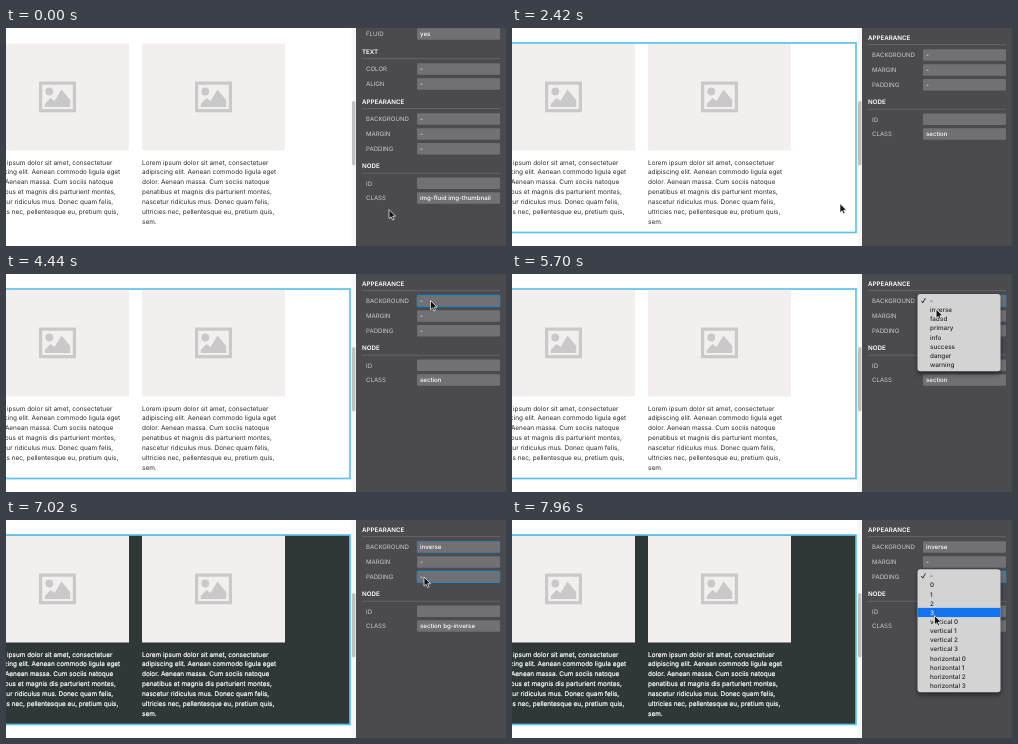
These frames come from a looping animation (500 px wide and 218 px high, 8 s). An HTML page:

```html
<!DOCTYPE html>
<html lang="en">
<head>
<meta charset="utf-8">
<title>Page builder: section background</title>
<style>
html, body { margin: 0; width: 100%; height: 100%; overflow: hidden; background: #fff; }
svg { display: block; width: 500px; height: 218px; font-family: Inter, Roboto, sans-serif; text-rendering: geometricPrecision; }
.copy { font-size: 6.45px; }
.label { font-size: 6.1px; fill: #c9c9cb; }
.head { font-size: 6.2px; font-weight: 600; fill: #fff; }
.value { font-size: 6.15px; font-weight: 500; fill: #fff; }
.item { font-size: 6.3px; font-weight: 500; }
</style>
</head>
<body>
<svg id="stage" viewBox="0 0 500 218"></svg>
<script>
const LOOP = 8000;
const stage = document.getElementById('stage');

function add(parent, tag, attrs = {}, text) {
  const el = document.createElementNS('http://www.w3.org/2000/svg', tag);
  for (const k in attrs) el.setAttribute(k, attrs[k]);
  if (text !== undefined) el.textContent = text;
  parent.appendChild(el);
  return el;
}
const rect = (p, x, y, width, height, fill, more) => add(p, 'rect', { x, y, width, height, fill, ...more });
const label = (p, x, y, cls, str) => add(p, 'text', { x, y, class: cls }, str);
const show = (el, on) => el.setAttribute('visibility', on ? 'visible' : 'hidden');

// Page
rect(stage, 0, 0, 350, 218, '#fff');
const dark = rect(stage, -5, 15, 349, 190, '#2f3737');

const lines = [
  'Lorem ipsum dolor sit amet, consectetuer',
  'adipiscing elit. Aenean commodo ligula eget',
  'dolor. Aenean massa. Cum sociis natoque',
  'penatibus et magnis dis parturient montes,',
  'nascetur ridiculus mus. Donec quam felis,',
  'ultricies nec, pellentesque eu, pretium quis,',
  'sem.'
];
const copy = add(stage, 'g', { class: 'copy' });
for (const x of [-20, 136]) {
  rect(stage, x, 15.5, 143, 107, '#f4efef');
  const icon = add(stage, 'g', { transform: `translate(${x + 53} 53.5)` });
  rect(icon, 1.6, 1.6, 33.8, 27.6, 'none', { stroke: '#c9c9c9', 'stroke-width': 3.2 });
  add(icon, 'circle', { cx: 10.3, cy: 10, r: 3.9, fill: '#c9c9c9' });
  add(icon, 'path', { d: 'M5.8 25.6V22.5L11.5 16.5L15.5 19.5L22.5 8L31.2 18.5V25.6Z', fill: '#c9c9c9' });
  lines.forEach((s, i) => label(copy, x, 136.5 + i * 9.85, 'copy', s));
}
const outline = rect(stage, -5, 15, 349, 189.5, 'none', { stroke: '#5cc3ec', 'stroke-width': 1.7 });
rect(stage, 345.5, 0, 4.5, 218, '#f7f7f7');
rect(stage, 346, 73, 3.4, 64.5, '#c1c1c1', { rx: 1.7 });

// Inspector
rect(stage, 350, 0, 150, 218, '#4b4a4e');
const panel = add(stage, 'g');

function heading(y, str) {
  label(panel, 356, y + 2.6, 'head', str);
  rect(panel, 356, y + 7.3, 138, 0.8, '#6a696d');
}
function field(y, name, value) {
  label(panel, 360, y + 2.4, 'label', name);
  rect(panel, 411, y - 5.8, 83, 11.6, '#717074', { rx: 1 });
  const ring = rect(panel, 411.2, y - 5.6, 82.6, 11.2, 'none', { rx: 1, stroke: '#2385ba', 'stroke-width': 1.2 });
  return { ring, text: label(panel, 414, y + 2.4, 'value', value) };
}
field(6, 'FLUID', 'yes');
heading(23, 'TEXT');
field(41, 'COLOR', '-');
field(56, 'ALIGN', '-');
heading(73, 'APPEARANCE');
const bg = field(91, 'BACKGROUND', '-');
field(106, 'MARGIN', '-');
const pad = field(120.7, 'PADDING', '-');
heading(137.5, 'NODE');
field(155.3, 'ID', '');
const cls = field(170, 'CLASS', '');
panel.querySelectorAll('rect[stroke]').forEach(r => r.setAttribute('opacity', 0));

// Menus
const defs = add(stage, 'defs');
const blur = add(defs, 'filter', { id: 'soft', x: '-20%', y: '-20%', width: '140%', height: '140%' });
add(blur, 'feGaussianBlur', { stdDeviation: 2.5 });

function menu(top, items) {
  const g = add(stage, 'g');
  const h = items.length * 9.15 + 4;
  rect(g, 405.5, top + 2, 83, h + 1, '#000', { rx: 3, opacity: 0.45, filter: 'url(#soft)' });
  rect(g, 405.5, top, 83, h, '#d3d3d4', { rx: 3 });
  const bar = rect(g, 405.5, 0, 83, 9.15, '#1273f0');
  const tick = add(g, 'path', { d: `M409.3 ${top + 6.8}l1.5 2.1l2.6 -4.8`, fill: 'none', 'stroke-width': 1 });
  const texts = items.map((s, i) => label(g, 418, top + 8.9 + i * 9.15, 'item', s));
  return (opacity, row) => {
    g.setAttribute('opacity', opacity);
    show(bar, row >= 0);
    bar.setAttribute('y', top + 2 + row * 9.15);
    texts.forEach((el, i) => el.setAttribute('fill', i === row ? '#fff' : '#262626'));
    tick.setAttribute('stroke', row === 0 ? '#fff' : '#262626');
  };
}
const range = name => [0, 1, 2, 3].map(n => `${name}${n}`);
const bgMenu = menu(20, ['-', 'inverse', 'faded', 'primary', 'info', 'success', 'danger', 'warning']);
const padMenu = menu(49.3, ['-', ...range(''), ...range('vertical '), ...range('horizontal ')]);

// Pointer
const pointer = add(stage, 'path', {
  d: 'M0 0V9.2L2.1 7.3L3.5 10.5L5.1 9.8L3.7 6.7H6.6Z',
  fill: '#111', stroke: '#fff', 'stroke-width': 0.7, 'stroke-linejoin': 'round'
});

// time, x, y
const path = [
  [0, 383, 181.5], [350, 384, 182], [840, 386, 182], [1560, 328, 175.5],
  [2520, 328, 175.5], [3250, 353, 144], [4080, 424.5, 27], [4240, 424.5, 26.5],
  [5050, 424.5, 26.5], [5450, 424, 35], [6230, 424.5, 35.5], [6600, 419, 56.5],
  [6740, 418, 57], [7700, 418, 57], [7940, 422.5, 95.5], [8000, 422.5, 95.5]
];
const ramp = (t, a, b) => Math.min(1, Math.max(0, (t - a) / (b - a)));

function locate(t) {
  const i = path.findIndex(p => p[0] > t);
  const [ta, xa, ya] = path[i - 1], [tb, xb, yb] = path[i];
  const u = ramp(t, ta, tb), e = u * u * (3 - 2 * u);
  return [xa + (xb - xa) * e, ya + (yb - ya) * e];
}

function draw(t) {
  const [x, y] = locate(t);
  pointer.setAttribute('transform', `translate(${x} ${y})`);

  const picked = t >= 1800, inverse = t >= 6400;
  panel.setAttribute('transform', `translate(0 ${picked ? -64 : 0})`);
  show(outline, t >= 1260);
  show(dark, inverse);
  copy.setAttribute('fill', inverse ? '#fff' : '#292b2c');
  copy.setAttribute('stroke', inverse ? '#fff' : 'none');
  copy.setAttribute('stroke-width', 0.2);
  cls.text.textContent = inverse ? 'section bg-inverse' : picked ? 'section' : 'img-fluid img-thumbnail';
  bg.text.textContent = t >= 5800 ? 'inverse' : '-';
  bg.ring.setAttribute('opacity', ramp(t, 4260, 4400) - ramp(t, 6960, 7110));
  pad.ring.setAttribute('opacity', ramp(t, 6900, 7010));

  const row = top => Math.floor((y - top - 2) / 9.15);
  const flash = t >= 5640 && t < 5720;
  bgMenu(t < 4540 ? 0 : 1 - ramp(t, 5790, 5950), flash ? -1 : row(20));
  padMenu(t < 7120 ? 0 : 1, Math.max(0, row(49.3)));
}

const start = performance.now();
function tick() {
  draw((performance.now() - start) % LOOP);
  requestAnimationFrame(tick);
}
draw(0);
requestAnimationFrame(tick);
</script>
</body>
</html>
```
